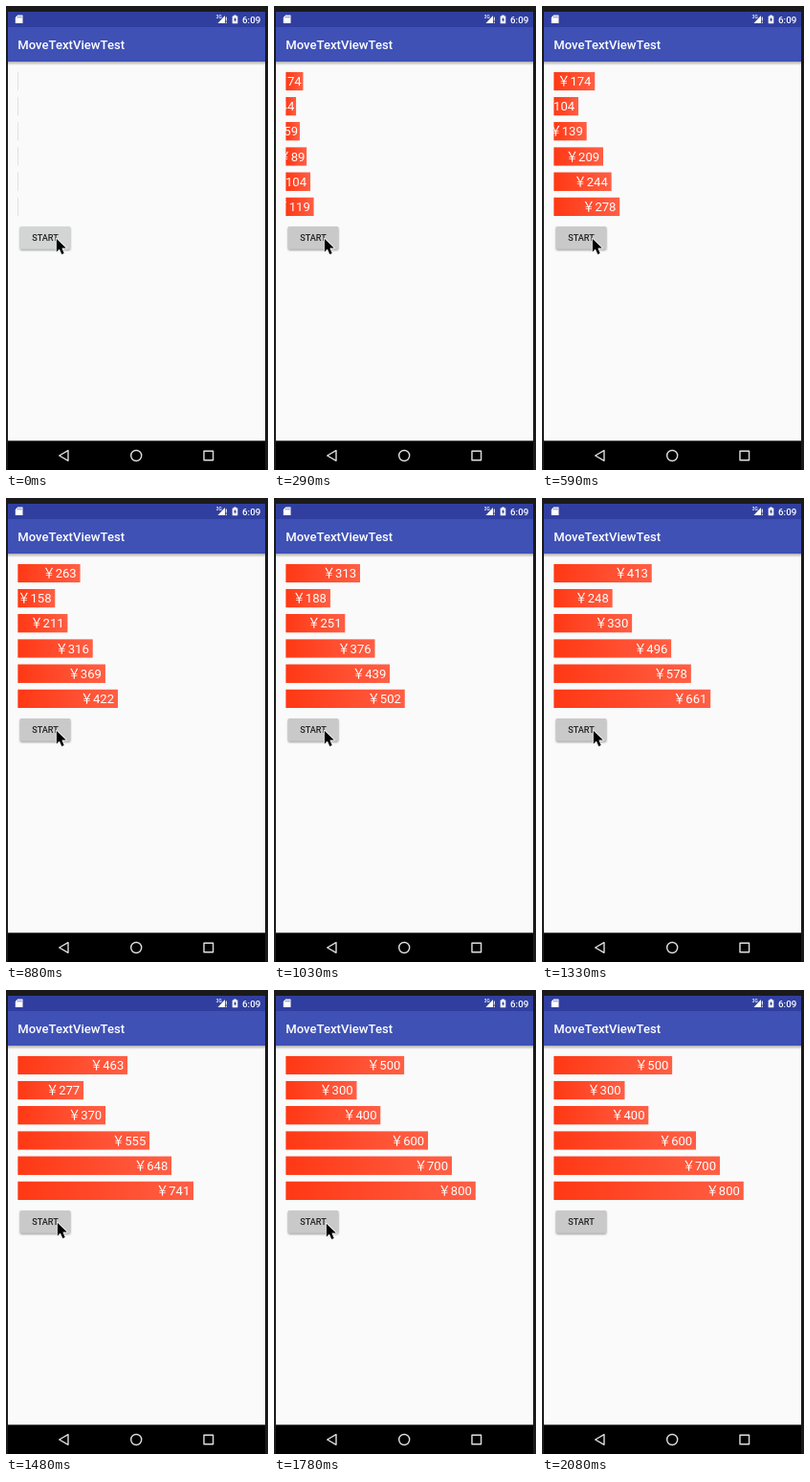
Write an HTML page that moves like this. It is 274x484 px and loops after 2820 ms.

```html
<!DOCTYPE html>
<html lang="en">
<head>
<meta charset="utf-8">
<title>MoveTextViewTest</title>
<style>
  html, body { margin: 0; height: 100%; overflow: hidden; background: #1a1a1a; }
  svg { display: block; }
  text { font-family: Roboto, "Noto Sans CJK SC", "Noto Sans CJK JP", "Noto Sans CJK", sans-serif; }
  .medium { font-weight: 500; }
</style>
</head>
<body>
<svg id="stage" width="274" height="484" viewBox="0 0 274 484">
  <defs>
    <linearGradient id="red">
      <stop offset="0" stop-color="#ff3814"/>
      <stop offset="1" stop-color="#ff5f45"/>
    </linearGradient>
    <linearGradient id="shade" x2="0" y2="1">
      <stop offset="0" stop-color="#000" stop-opacity=".3"/>
      <stop offset="1" stop-color="#000" stop-opacity="0"/>
    </linearGradient>
    <filter id="soft" x="-20%" y="-20%" width="140%" height="150%">
      <feGaussianBlur stdDeviation=".9"/>
    </filter>
  </defs>

  <rect width="274" height="484" fill="#1a1a1a"/>
  <rect x="2" y="22" width="269" height="432" fill="#fafafa"/>
  <rect x="2" y="6" width="269" height="16" fill="#303f9f"/>
  <rect x="2" y="22" width="269" height="36" fill="#3f51b5"/>
  <rect x="2" y="58" width="269" height="4" fill="url(#shade)"/>
  <text class="medium" x="12.3" y="45" font-size="13.1" fill="#fff">MoveTextViewTest</text>

  <!-- status icons -->
  <path d="M12.2 9.5H17.5V18H9.8V12Z" fill="#fff"/>
  <path d="M12.6 10.7v1.7M14.3 10.7v1.7M16 10.7v1.7" stroke="#303f9f" stroke-width=".7"/>
  <text class="medium" x="219.8" y="13" font-size="4.8" fill="#fff">3G</text>
  <path d="M229 10V18H221.5Z" fill="#fff"/>
  <path d="M230.3 11.5v4M230.3 16.6v1.4" stroke="#fff" stroke-width="1"/>
  <path d="M238.3 9.4h2.4v1h1.6V18.2h-5.6V10.4h1.6Z" fill="#fff"/>
  <path d="M240 11.4l-2 3.4h1.3v2.2l1.9-3.3h-1.2Z" fill="#303f9f"/>
  <text class="medium" x="247" y="17.6" font-size="9.8" fill="#fff">6:09</text>

  <g id="bars"></g>

  <rect x="14.8" y="231.2" width="52.4" height="23.6" rx="1.3" fill="#000" opacity=".4" filter="url(#soft)"/>
  <rect id="button" x="14.6" y="230" width="52.8" height="23.7" rx="1.3"/>
  <text class="medium" x="41" y="245.2" font-size="9.16" text-anchor="middle" fill="#212121">START</text>

  <!-- navigation bar -->
  <rect x="2" y="453.5" width="269" height="30.5" fill="#000"/>
  <g fill="none" stroke="#e0e0e0" stroke-width="1.4" stroke-linejoin="round">
    <path d="M65 463.7V474.3L55.7 469Z"/>
    <circle cx="136.2" cy="469" r="5.5"/>
    <rect x="207" y="464.2" width="9.6" height="9.6"/>
  </g>

  <path id="cursor" d="M.8 .8V14.4L3.9 11.5L6.3 17L8.7 16L6.4 10.6H10.8Z"
        stroke="#fff" stroke-width="1.6" paint-order="stroke" stroke-linejoin="round"/>
</svg>
<script>
const LOOP = 2820;
const FULL = 198.7;   // width of the bar worth 800
const HEIGHT = 19.6;

// [time, value]: each value holds until the next time
const progress = [[0, 0], [140, .049], [290, .1488], [440, .2487], [590, .3486], [740, .428],
  [880, .5278], [1030, .6275], [1180, .727], [1330, .8267], [1480, .9264], [1630, 1]];
const cursorAt = [[0, [52, 242]], [1330, [53, 242]], [1780, [54, 243]], [1930, [115, 285]], [2080, null]];
const buttonFill = [[0, '#d3d5d4'], [140, '#cdcecd'], [290, '#c9c9c9']];

const held = (steps, t) => steps.findLast(([start]) => start <= t)[1];
const byId = id => document.getElementById(id);

function add(parent, tag, attrs) {
  const node = document.createElementNS('http://www.w3.org/2000/svg', tag);
  set(node, attrs);
  return parent.appendChild(node);
}

function set(node, attrs) {
  for (const name in attrs) node.setAttribute(name, attrs[name]);
}

const bars = [500, 300, 400, 600, 700, 800].map((total, row) => {
  const box = add(byId('bars'), 'svg', { x: 12.2, y: 68.7 + row * 26.16, height: HEIGHT });
  return {
    total, box,
    fill: add(box, 'rect', { height: HEIGHT }),
    label: add(box, 'text', { y: 14.4, 'font-size': 13.1, 'text-anchor': 'end', fill: '#fff' })
  };
});

function draw(t) {
  const p = held(progress, t);
  for (const { total, box, fill, label } of bars) {
    const value = Math.floor(total * p + 1e-6);
    const width = p ? FULL * total * p / 800 : .8;
    set(box, { width });
    set(fill, { width, fill: p ? 'url(#red)' : '#d4d4d4' });
    set(label, { x: width - (value < 100 ? 2 : 4) });
    label.textContent = p ? '￥' + value : '';
  }
  set(byId('button'), { fill: held(buttonFill, t) });
  const spot = held(cursorAt, t);
  set(byId('cursor'), spot
    ? { transform: `translate(${spot})`, visibility: 'visible' }
    : { visibility: 'hidden' });
}

function frame() {
  draw(performance.now() % LOOP);
  requestAnimationFrame(frame);
}
frame();
</script>
</body>
</html>
```
